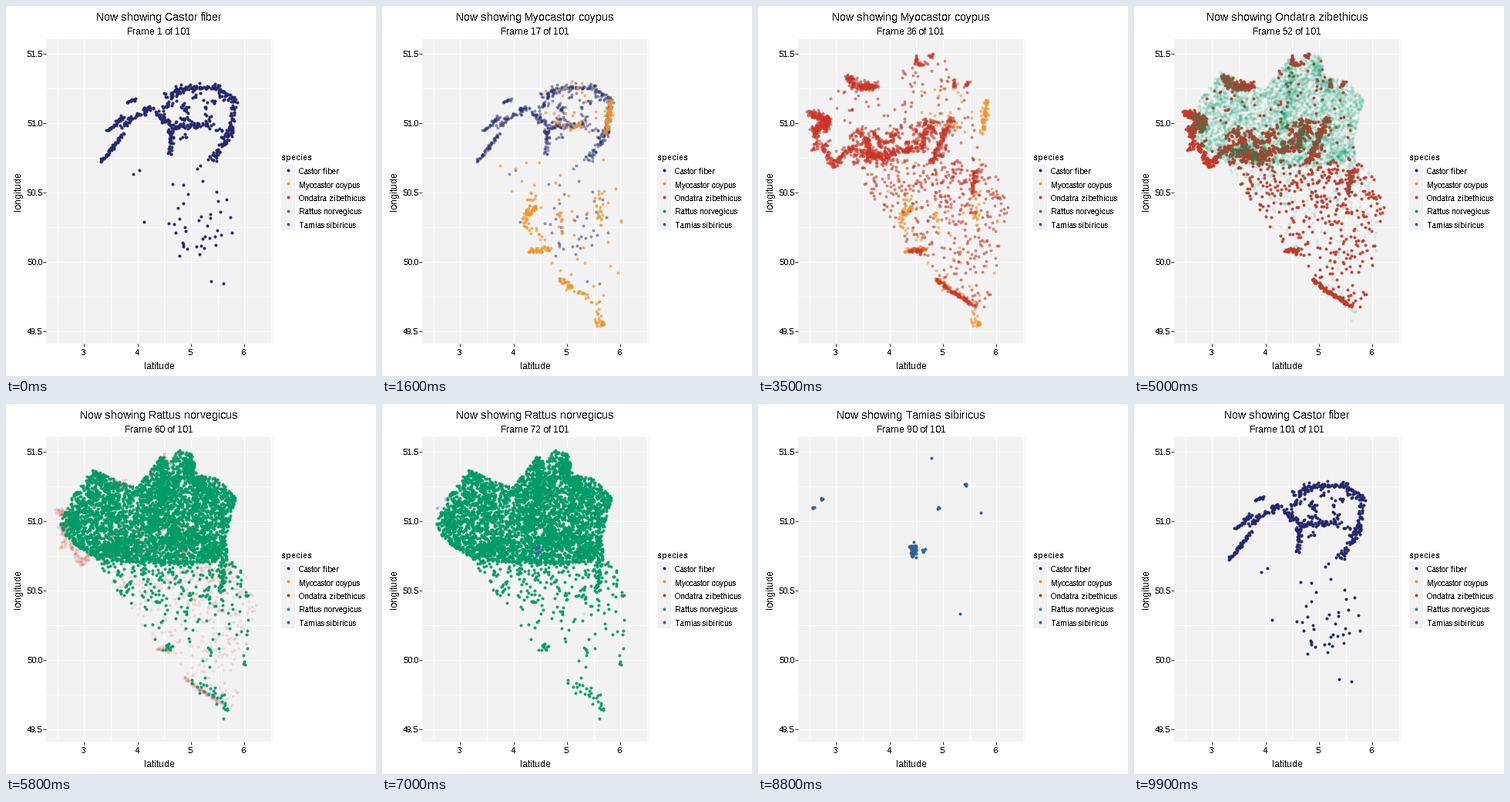
A matplotlib script for the animation above (10 s loop, 480 by 480 pixels).

```python
import numpy as np
import matplotlib.pyplot as plt
from matplotlib.animation import FuncAnimation
from matplotlib.patches import Rectangle
from matplotlib.path import Path

# crisp, grid-fitted lettering
plt.rcParams.update({
    "font.family": "Liberation Sans",
    "text.hinting": "force_autohint",
    "text.hinting_factor": 1,
    "text.antialiased": False,
})

SIZE, DPI = 480, 72          # 72 dpi: one point is one pixel
LEFT, TOP, WIDTH, HEIGHT = 52, 43, 294, 395
GREY = "#F2F2F2"
SPECIES = {
    "Castor fiber": "#25286F",
    "Myocastor coypus": "#EF942A",
    "Ondatra zibethicus": "#C93526",
    "Rattus norvegicus": "#009B66",
    "Tamias sibiricus": "#356196",
}
NAMES = list(SPECIES)
HOLD, FADE = 10, 10
STEP = HOLD + FADE
LABELS = STEP * len(NAMES) + 1
FRAMES = 100

# outlines of the two halves of the map, in pixels
NORTH = [(68, 158), (84, 122), (113, 84), (140, 97), (168, 109), (202, 66),
         (212, 76), (222, 59), (240, 64), (248, 92), (273, 96), (298, 121),
         (284, 175), (288, 203), (225, 208), (120, 203), (85, 180)]
SOUTH = [(118, 203), (290, 198), (328, 245), (318, 300), (298, 392),
         (275, 388), (232, 352), (185, 300)]
EAST = [(205, 112), (250, 95), (294, 115), (286, 170), (212, 175)]

rng = np.random.default_rng(7)


def inside(poly, pts):
    return pts[Path(poly).contains_points(pts)]


def fill(poly, n):
    """Points spread evenly over a polygon."""
    pts = rng.uniform(np.min(poly, 0), np.max(poly, 0), (n * 6, 2))
    return inside(poly, pts)[:n]


def trails(density, spread, *paths):
    """Points strewn along polylines, so many per pixel of length."""
    out = []
    for path in paths:
        for a, b in zip(np.array(path[:-1]), np.array(path[1:])):
            n = max(4, int(density * np.hypot(*(b - a))))
            out.append(a + rng.random((n, 1)) * (b - a)
                       + rng.normal(0, spread, (n, 2)))
    return np.vstack(out)


def streams(poly, groups, n, reach, spread):
    """Short random runs of points that stay inside a polygon."""
    start = fill(poly, groups)
    turn = rng.uniform(0, 2 * np.pi, len(start))
    way = reach * np.column_stack([np.cos(turn), np.sin(turn)])
    pts = np.repeat(start, n, 0) + np.repeat(way, n, 0) * rng.random(
        (len(start) * n, 1))
    return inside(poly, pts + rng.normal(0, spread, pts.shape))


def thinning(n, scale):
    """Southern points that grow rarer towards the bottom."""
    pts = fill(SOUTH, n)
    return pts[rng.random(len(pts)) < np.exp((200 - pts[:, 1]) / scale)]


def castor():
    return np.vstack([
        trails(1.1, 1.2, [(124, 202), (152, 165)],
               [(131, 162), (152, 144)], [(157, 124), (170, 121)]),
        trails(1.1, 2.5, [(148, 154), (188, 132), (214, 156), (265, 153)],
               [(214, 158), (213, 195)],
               [(206, 130), (222, 108), (270, 104), (296, 122), (290, 165)],
               [(290, 165), (278, 186), (265, 200)]),
        streams(EAST, 16, 5, 10, 1.5),
        fill([(205, 285), (300, 240), (296, 305), (235, 330)], 30),
        fill(SOUTH, 16),
    ])


def myocastor():
    return np.vstack([
        trails(1.5, 2, [(181, 274), (202, 260)], [(188, 318), (216, 315)],
               [(231, 354), (246, 367)], [(277, 411), (291, 411)],
               [(297, 122), (290, 165)]),
        trails(.45, 2.5, [(195, 238), (184, 285), (212, 302)],
               [(229, 265), (234, 294)], [(281, 240), (283, 285)],
               [(246, 367), (281, 385), (281, 402)], [(222, 152), (264, 157)]),
        fill(SOUTH, 36),
        fill(EAST, 22),
    ])


def ondatra():
    band = [(118, 160), (215, 145), (252, 150), (240, 200), (120, 206)]
    return np.vstack([
        trails(3.5, 2.5, [(67, 139), (90, 147), (72, 162)],
               [(117, 92), (125, 104), (152, 104)]),
        trails(1.7, 2.2, [(90, 140), (89, 160)], [(75, 162), (74, 186)],
               [(72, 160), (92, 155)],
               [(84, 180), (96, 207), (118, 184), (150, 195), (215, 181)],
               [(214, 181), (217, 152)], [(224, 204), (250, 145)],
               [(132, 162), (145, 178), (145, 196)], [(148, 162), (168, 190)],
               [(281, 214), (279, 240)]),
        trails(1.4, 1.4, [(204, 64), (206, 75), (216, 75)],
               [(222, 67), (227, 64)], [(254, 96), (255, 107)],
               [(268, 104), (275, 98)], [(195, 318), (217, 316)],
               [(231, 354), (246, 367), (284, 390)]),
        streams(band, 45, 8, 14, 1.6),
        fill(NORTH, 130),
        thinning(320, 60),
        fill(SOUTH, 270),
    ])


def rattus():
    return np.vstack([
        fill(NORTH, 2700),
        streams(NORTH, 150, 8, 16, 2.2),
        inside(NORTH, trails(2.5, 4, [(203, 72), (203, 125), (190, 165)],
                             [(117, 90), (127, 104)], [(122, 192), (150, 180)],
                             [(235, 70), (245, 100)], [(216, 185), (218, 152)],
                             [(255, 196), (284, 186)])),
        thinning(750, 48),
        streams(SOUTH, 14, 4, 8, 1.5),
        trails(.9, 2.5, [(281, 205), (280, 242)], [(204, 320), (215, 313)]),
        trails(.4, 6, [(240, 358), (280, 385), (288, 408)]),
    ])


def tamias():
    spots = [(72, 134), (82, 124), (234, 135), (270, 106), (215, 189)]
    return np.vstack([
        trails(1, 1.3, *[[p, p] for p in spots]),
        trails(3.5, 1.7, [(197, 185), (203, 185), (201, 197)]),
        [(262, 272), (225, 70), (289, 141)],
    ])


fig = plt.figure(figsize=(SIZE / DPI, SIZE / DPI), dpi=DPI, facecolor="white")
ax = fig.add_axes([0, 0, 1, 1])
ax.set(xlim=(0, SIZE), ylim=(SIZE, 0))
ax.axis("off")


def rule(xs, ys, color):
    ax.plot(xs, ys, color=color, lw=1, solid_capstyle="butt", zorder=1)


def label(x, y, s, size, **kw):
    return ax.text(x, y, s, size=size, va="baseline", zorder=5, **kw)


def dots(pts, color, z):
    x, y = np.round(pts).T
    return ax.plot(x, y, "o", color=color, ms=3, mew=1, zorder=z)[0]


def box(x, y, w, h):
    ax.add_patch(Rectangle((x, y), w, h, fc=GREY, lw=0, zorder=0))


box(LEFT, TOP, WIDTH, HEIGHT)
for lon in np.arange(2.5, 6.6, .5):
    x = np.floor(100.7 + (lon - 3) * 69.4) + .5
    rule([x, x], [TOP, TOP + HEIGHT], "white")
    if lon % 1 == 0:
        rule([x, x], [TOP + HEIGHT, TOP + HEIGHT + 4], "#333333")
        label(x, 453, f"{lon:.0f}", 10, ha="center")
for lat in np.arange(49.5, 51.6, .25):
    y = np.floor(61.3 + (51.5 - lat) * 180.2) + .5
    rule([LEFT, LEFT + WIDTH], [y, y], "white")
    if lat % .5 == 0:
        rule([LEFT - 4, LEFT], [y, y], "#333333")
        label(47, y + 4, f"{lat:.1f}", 10, ha="right")

label(199, 471, "latitude", 12, ha="center")
ax.text(16, 241, "longitude", size=12, rotation=90, ha="center", va="center")

label(357, 200, "species", 10, weight="bold")
box(357, 205, 18, 86.4)
for j, (name, color) in enumerate(SPECIES.items()):
    y = 213 + 17.5 * j
    dots([[366, y]], color, 3)
    label(380, y + 5, name, 10)

title = label(198.5, 19, "", 14, ha="center")
subtitle = label(198.5, 37, "", 12, ha="center")

makers = (castor, myocastor, ondatra, rattus, tamias)
layers = [dots(make(), SPECIES[name], 2 + .1 * j)
          for j, (name, make) in enumerate(zip(NAMES, makers))]


def draw(i):
    k = i + (i >= FRAMES // 2)      # 101 labels over 100 frames: one is skipped
    here = k // STEP % len(NAMES)
    after = (here + 1) % len(NAMES)
    p = max(0, k % STEP - HOLD) / FADE
    alpha = {here: 1 - p, after: p}
    for j, layer in enumerate(layers):
        a = alpha.get(j, 0)
        layer.set_visible(a > 0)
        layer.set_alpha(a)
    title.set_text("Now showing " + NAMES[after if p > .5 else here])
    subtitle.set_text(f"Frame {k + 1} of {LABELS}")
    return [*layers, title, subtitle]


anim = FuncAnimation(fig, draw, frames=FRAMES, interval=100, repeat=True,
                     repeat_delay=0, blit=False)
plt.show()
```
